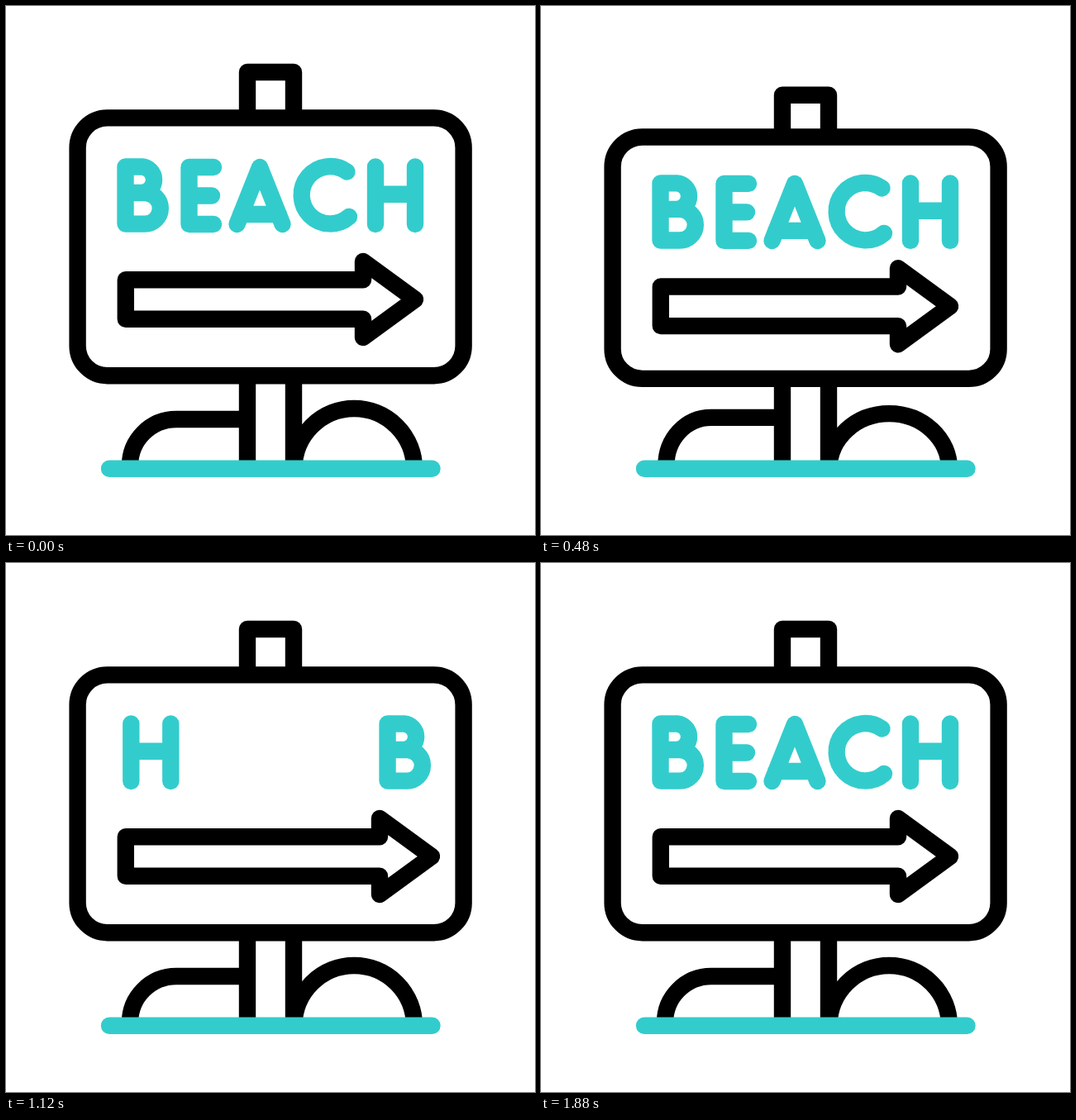
An HTML page with a canvas for the animation above (2 s loop, 640x640 px).

```html
<!DOCTYPE html>
<html lang="en">
<head>
<meta charset="utf-8">
<title>Beach sign</title>
<style>
  html, body { margin: 0; width: 100%; height: 100%; overflow: hidden; background: #fff; }
  canvas { display: block; }
</style>
</head>
<body>
<canvas id="stage" width="640" height="640"></canvas>
<script>
const ctx = document.getElementById('stage').getContext('2d');
const LOOP = 2000, BLACK = '#000', TEAL = '#33cccc';

// Resting strokes; exit = distance right 120 ms after leaving,
// end = arrival time, lag = relative entry speed.
const letters = [
  { d: 'M144.5 194.5H164.5A15.8 15.8 0 0 1 164.5 226H144.5H168A18.8 18.8 0 0 1 168 263.6H144.5Z', exit: 22, end: 1880, lag: 1.5 },
  { d: 'M251 195H221.5V264H251M221.5 229.5H249', exit: 26, end: 1805, lag: 1.45 },
  { d: 'M279.5 264L307 195L334.5 264M284 252H330', exit: 35, end: 1730, lag: 1.37 },
  { d: 'M412.5 200.5A34.7 34.7 0 1 0 415 255', exit: 44, end: 1655, lag: 1.25 },
  { d: 'M447 194.5V264M495 194.5V264M447 227.8H495', exit: 56, end: 1580, lag: 1 }
].map(l => ({ ...l, path: new Path2D(l.d) }));

function ease(t, from, to) {
  const u = Math.min(1, Math.max(0, (t - from) / (to - from)));
  return u * u * (3 - 2 * u);
}

// Jump up, squash down, settle.
function bounce(t) {
  const rise = ease(t, 0, 400), fall = ease(t, 400, 535), settle = ease(t, 535, 933);
  const up = rise * (1 - fall), down = fall * (1 - settle);
  return (high, low) => high * up + low * down;
}

function stroke(path, color = BLACK, cap = 'butt', width = 20.4) {
  ctx.strokeStyle = color;
  ctx.lineCap = cap;
  ctx.lineWidth = width;
  ctx.stroke(typeof path === 'string' ? new Path2D(path) : path);
}

function drawLetter(letter, dx, dy) {
  ctx.save();
  ctx.translate(dx, dy);
  stroke(letter.path, TEAL, 'round');
  ctx.restore();
}

function drawText(t, dy) {
  for (const l of letters) {
    const out = l.exit * Math.max(0, (t - 560) / 120) ** 1.73;
    if (out < 480) drawLetter(l, out, dy);
    const left = Math.max(0, l.end - t) / 100;
    if (t > 900) drawLetter(l, -31 * l.lag * left ** 1.48, dy);
  }
}

function draw(t) {
  const move = bounce(t);
  ctx.fillStyle = '#fff';
  ctx.fillRect(0, 0, 640, 640);
  ctx.lineJoin = 'round';

  // Rocks and post
  const rock = 500 + move(-18, 6.5), base = 150 + move(4, 0);
  const k = (556 - rock) * 0.552;
  stroke(`M${base} 556C${base} ${556 - k} 175 ${rock} 206 ${rock}H292`);
  stroke(`M348.5 560A72.7 ${73 - move(-12, 16)} 0 0 1 494 560`);
  const top = 80 + move(-27, 57.6);
  stroke(`M292 560V${top}H348V560`);

  // Board
  const y1 = 135.4 + move(-19, 46), y2 = 447.2 + move(-19, 16);
  const board = new Path2D();
  board.roundRect(86.6, y1, 467, y2 - y1, 36);
  ctx.fill(board);
  ctx.save();
  ctx.clip(board);
  drawText(t, move(-27, 45.4));
  ctx.restore();
  stroke(board);

  // Arrow: only the head stretches sideways
  const head = 432 + 20 * (ease(t, 680, 1080) - ease(t, 1480, 1820));
  ctx.save();
  ctx.translate(0, move(-36, 32.4));
  stroke(`M144.8 331.2H${head}V309L${head + 63} 355L${head} 401V378.8H144.8Z`);
  ctx.restore();

  stroke('M125 559.8H515.5', TEAL, 'round');
}

function tick(now) {
  draw(now % LOOP);
  requestAnimationFrame(tick);
}
draw(0);
requestAnimationFrame(tick);
</script>
</body>
</html>
```
